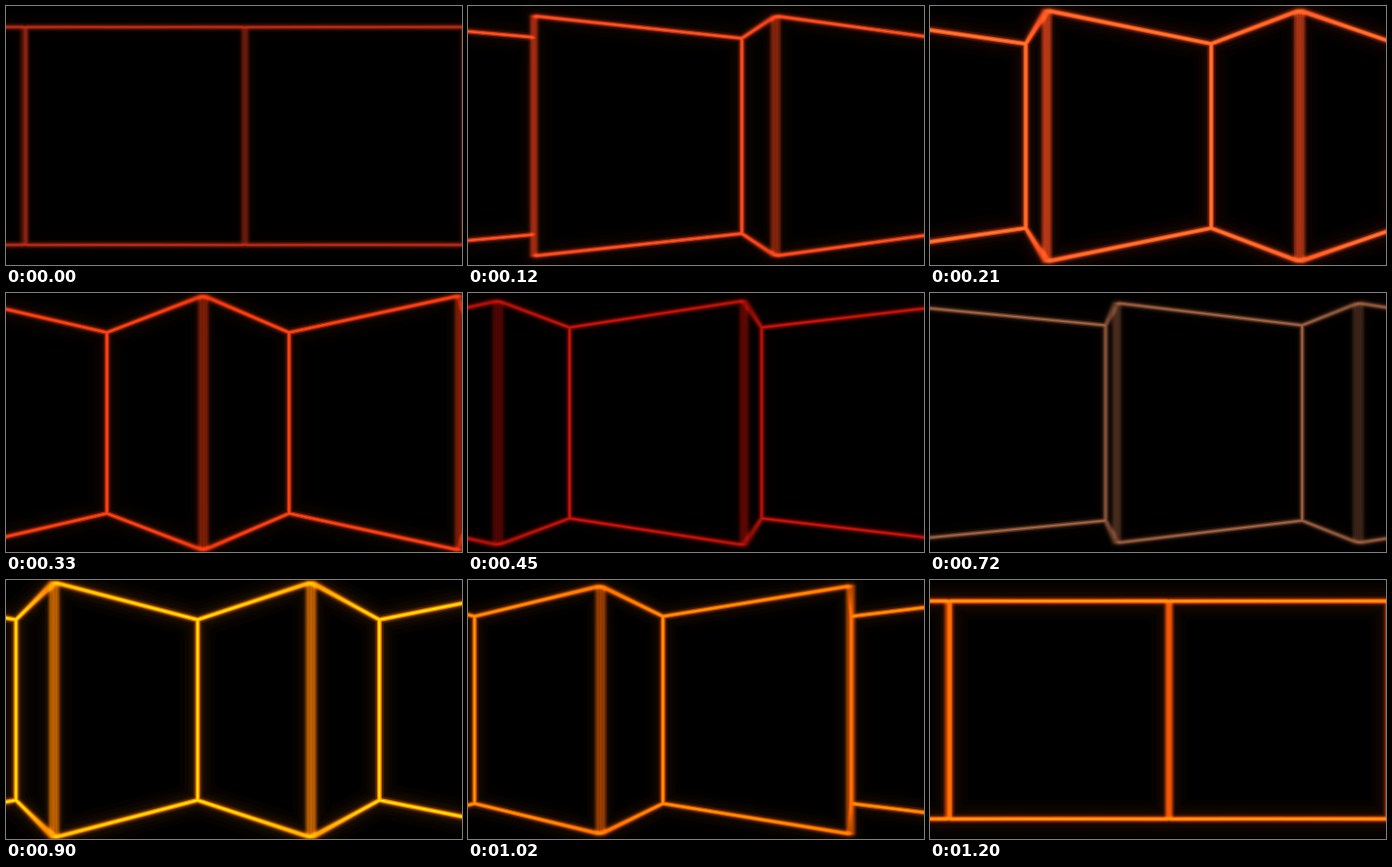
Write an HTML page with a canvas that moves like this. It is 500 by 285 pixels and loops after 1230 ms.

```html
<!DOCTYPE html>
<html lang="en">
<head>
<meta charset="utf-8">
<title>Turning neon cubes</title>
<style>
  html, body { margin: 0; width: 100%; height: 100%; overflow: hidden; background: #000; }
  canvas { display: block; }
</style>
</head>
<body>
<canvas id="stage" width="500" height="285"></canvas>
<script>
const ctx = document.getElementById('stage').getContext('2d');
const LOOP = 1230, STEP = 30, SPIN = 1200;   // ms; SPIN is a half turn
const SIDE = 240.5, CAMERA = 340, CX = 250, CY = 143;
const SHUTTER = 15, SAMPLES = 8;

// time, red, green, blue
const COLORS = [
  [0, 105, 22, 15], [210, 230, 65, 20], [450, 115, 10, 5], [720, 88, 56, 36],
  [900, 255, 120, 0], [1020, 210, 82, 3], [1200, 245, 85, 5]
];
const CORE = [[2, 0.9], [5, 0.7], [9, 0.2]];                // width, strength
const HALO = [[13, 0.04], [20, 0.03], [28, 0.025], [40, 0.02]];

function colorAt(t) {
  const i = Math.max(1, COLORS.findIndex(c => c[0] >= t));
  const a = COLORS[i - 1], b = COLORS[i];
  const f = (t - a[0]) / (b[0] - a[0]);
  return [1, 2, 3].map(n => a[n] + (b[n] - a[n]) * f);
}

// Outline of the visible front of the cube row.
function outline(t) {
  const path = new Path2D();
  const turn = ((t / SPIN * 2 + 2) % 1) * Math.PI / 2;
  const s = Math.sin(turn), c = Math.cos(turn);
  const zNear = SIDE / 2 * (s + c - 1);
  const near = CAMERA / (CAMERA - zNear);
  const far = CAMERA / (CAMERA - zNear + SIDE * s * c);
  const first = 132.25 + SIDE * t / SPIN + SIDE / 2 * (s - c);
  const half = SIDE / 2 - 0.4;
  const hNear = half * near, hFar = half * far;

  const upright = (x, h) => {
    path.moveTo(x, CY - h);
    path.lineTo(x, CY + h);
  };
  const rails = (...points) => {
    for (const side of [-1, 1])
      points.forEach(([x, h], i) => path[i ? 'lineTo' : 'moveTo'](x, CY + side * h));
  };

  for (let i = -4; i < 3; i++) {
    const x = first + i * SIDE;
    const left = CX + x * near, right = CX + (x + SIDE) * near;
    const valley = CX + (x + SIDE * c * c) * far;
    const cut = (from, to) => [to, hNear + (hFar - hNear) * (to - from) / (valley - from)];
    upright(left, hNear);
    if (valley > right) {
      rails([left, hNear], cut(left, right));
    } else if (valley < left) {
      rails([right, hNear], cut(right, left));
    } else {
      rails([left, hNear], [valley, hFar], [right, hNear]);
      upright(valley, hFar);
    }
  }
  return path;
}

function glow(path, color, layers, gain) {
  for (const [width, strength] of layers) {
    ctx.lineWidth = width;
    ctx.strokeStyle = `rgb(${color.map(v => Math.round(v * strength * gain)).join(',')})`;
    ctx.stroke(path);
  }
}

function draw(t) {
  const color = colorAt(t);
  ctx.globalCompositeOperation = 'source-over';
  ctx.fillStyle = '#000';
  ctx.fillRect(0, 0, 500, 285);
  ctx.globalCompositeOperation = 'lighter';
  ctx.lineJoin = ctx.lineCap = 'round';
  glow(outline(t), color, HALO, color[0] / 255);
  for (let i = 0; i < SAMPLES; i++) {
    const shift = ((i + 0.5) / SAMPLES - 0.5) * SHUTTER;
    glow(outline(t + shift), color, CORE, 1 / SAMPLES);
  }
}

const start = performance.now();
function tick() {
  const t = (performance.now() - start) % LOOP;
  draw(Math.floor(t / STEP) * STEP);
  requestAnimationFrame(tick);
}
tick();
</script>
</body>
</html>
```
